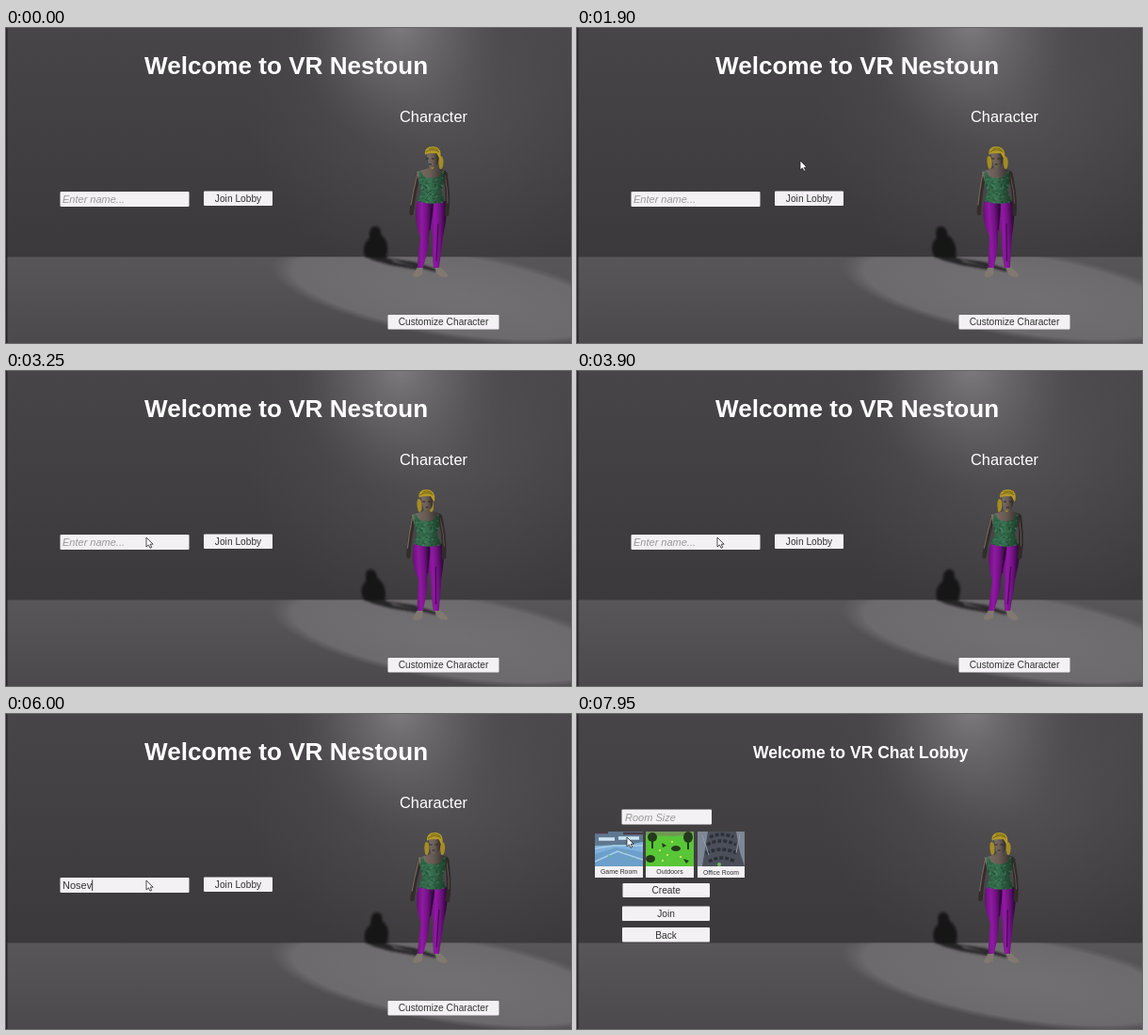
Recreate the animation shown at these times as an HTML page. Size 600 by 335 pixels, loop 8 s.

```html
<!DOCTYPE html>
<html lang="en">
<head>
<meta charset="utf-8">
<title>VR Nestoun</title>
<style>
  html, body { margin: 0; width: 100%; height: 100%; overflow: hidden; background: #444; }
  svg { display: block; width: 100vw; height: 100vh; }
  text { font-family: "Liberation Sans", Arial, sans-serif; fill: #323232; }
  .title { font-weight: bold; fill: #fff; }
  .button { font-size: 10.2px; text-anchor: middle; }
  .hint { font-size: 11px; font-style: italic; fill: #999; }
  .label { font-size: 6.9px; text-anchor: middle; }
  .field { fill: #f3f1f3; }
</style>
</head>
<body>
<svg viewBox="0 0 600 335">
  <defs>
    <linearGradient id="wall" x2="0" y2="1">
      <stop offset="0" stop-color="#474547"/><stop offset=".5" stop-color="#413f41"/><stop offset="1" stop-color="#3b393b"/>
    </linearGradient>
    <radialGradient id="glow">
      <stop offset="0" stop-color="#666466" stop-opacity=".5"/><stop offset="1" stop-color="#5c5a5c" stop-opacity="0"/>
    </radialGradient>
    <radialGradient id="lamp">
      <stop offset="0" stop-color="#999799" stop-opacity=".65"/><stop offset=".55" stop-color="#807e80" stop-opacity=".32"/>
      <stop offset="1" stop-color="#666466" stop-opacity="0"/>
    </radialGradient>
    <linearGradient id="floor" x2="0" y2="1">
      <stop offset="0" stop-color="#585658"/><stop offset="1" stop-color="#4b494b"/>
    </linearGradient>
    <radialGradient id="pool">
      <stop offset="0" stop-color="#727072"/><stop offset=".87" stop-color="#6c6a6c"/>
      <stop offset="1" stop-color="#666466" stop-opacity="0"/>
    </radialGradient>
    <linearGradient id="trousers">
      <stop offset="0" stop-color="#641272"/><stop offset=".35" stop-color="#9119a4"/>
      <stop offset=".62" stop-color="#721283"/><stop offset="1" stop-color="#23062a"/>
    </linearGradient>
    <linearGradient id="shirt">
      <stop offset="0" stop-color="#31684b"/><stop offset=".45" stop-color="#37714f"/><stop offset="1" stop-color="#1b3a29"/>
    </linearGradient>
    <linearGradient id="skin">
      <stop offset="0" stop-color="#7d7068"/><stop offset=".5" stop-color="#685b54"/><stop offset="1" stop-color="#2b2625"/>
    </linearGradient>
    <pattern id="specks" width="16" height="18" patternUnits="userSpaceOnUse"></pattern>
    <filter id="soft" x="-30%" y="-30%" width="160%" height="160%"><feGaussianBlur stdDeviation="1"/></filter>
  </defs>

  <rect width="600" height="244" fill="url(#wall)"/>
  <svg width="600" height="244">
    <ellipse cx="465" cy="85" rx="210" ry="190" fill="url(#glow)"/>
    <ellipse cx="418" cy="-8" rx="112" ry="135" fill="url(#lamp)"/>
  </svg>
  <rect y="243.5" width="600" height="92" fill="url(#floor)"/>
  <svg y="243.5" width="600" height="92">
    <ellipse rx="192" ry="47" transform="translate(470 39) rotate(9)" fill="url(#pool)"/>
  </svg>
  <rect width="1.5" height="335" fill="#292729"/>

  <g id="shadow" filter="url(#soft)" fill="#171518">
    <path d="M389 212C394 209 399 213 398 220C403 223 406 230 405 237L404 244L382 244C378 237 380 228 386 224C386 219 386 214 389 212Z"/>
    <path d="M382 243L405 244L412 249L437 254V257L408 252L390 247ZM400 244L434 249L458 257L455 259L430 252Z" opacity=".85"/>
  </g>

  <g id="figure">
    <g fill="#817870">
      <path d="M438 253L443 253L442 262C438 266 431 266 432 262Z"/>
      <path d="M455 253L460 253L469 262C470 266 463 266 458 262Z"/>
    </g>
    <g fill="url(#trousers)">
      <path d="M450 183L467 184C469 196 467 208 464 222C463 234 461 245 460 255L454 255C453 244 452 233 453 222L449 200Z"/>
      <path d="M437 183L454 184C454 200 450 212 449 223C449 236 445 246 443 255L437 255C437 244 439 233 440 222C435 210 433 195 437 183Z"/>
    </g>
    <path d="M452 192L450 215M459 208L457 248" fill="none" stroke="#2d0735" stroke-width="1.3" opacity=".65"/>
    <g fill="none" stroke-linecap="round" stroke-linejoin="round">
      <path d="M438 155L434 173L432 184L430.500 197" stroke="#322d2b" stroke-width="4.500"/>
      <path d="M436.500 156L432.500 174L430 188" stroke="#74675f" stroke-width="1.300"/>
      <path d="M466.500 155L468.500 172L469 186L468 198" stroke="#302a29" stroke-width="4.500"/>
      <path d="M466 156L468.500 173L469 186" stroke="#625650" stroke-width="1"/>
    </g>
    <path d="M450 144L457 144L458 149L467 152L466 165L439 165L436 153L449 149Z" fill="url(#skin)"/>
    <path id="top" d="M439 152L441 152C443 160 448 159 453 160C458 159 461 158 463 152L465 152C466 162 464 168 462 173L466 185C457 188 445 187 437 184L441 173C438 166 438 159 439 152Z" fill="url(#shirt)"/>
    <path id="cloth" fill="url(#specks)"/>
    <g fill="#a48c24">
      <path id="braidLeft" d="M452 136C456 136 456 142 455 147C454 151 451 151 451 147C450 142 450 138 452 136Z"/>
      <path id="braidRight" d="M452 136C456 136 456 142 455 147C454 151 451 151 451 147C450 142 450 138 452 136Z"/>
    </g>
    <path d="M447 133C449 130 458 130 460 134L459 143C457 149 451 150 449 146Z" fill="url(#skin)"/>
    <path d="M445 135C444 129 448 126 453 126C460 126 463 131 461 139C459 138 459 135 457 133C453 134 449 132 445 135Z" fill="#b39a28"/>
    <path d="M446 132C450 129 456 129 460 132M449 129C453 127 456 128 459 130" fill="none" stroke="#65570f" stroke-width=".8"/>
    <path id="features" d="M448 139H451M454 139H457M451 145H454" stroke="#282321" stroke-width="1.1"/>
  </g>

  <g id="welcome">
    <text class="title" x="147" y="49" font-size="26.1">Welcome to VR Nestoun</text>
    <text x="418" y="100" font-size="16.4" style="fill:#fff">Character</text>
    <rect id="nameField" class="field" x="57.500" y="174" width="137" height="16" rx="1"/>
    <text id="nameHint" class="hint" x="60" y="186">Enter name...</text>
    <text id="name" x="60" y="186" font-size="11"></text>
    <rect id="caret" y="176.500" width="1" height="11.500" fill="#323232"/>
  </g>

  <g id="lobby">
    <text class="title" x="187" y="47" font-size="17.55">Welcome to VR Chat Lobby</text>
    <rect class="field" x="47.500" y="101.500" width="95.500" height="16" rx="1"/>
    <text class="hint" x="51" y="113.500">Room Size</text>
    <svg x="19" y="125" width="51" height="37">
      <rect width="51" height="37" fill="#7fb2dc"/>
      <path d="M0 0H51V11L35 14L0 15Z" fill="#5f7890"/>
      <path d="M0 24L22 17L51 22V37H0Z" fill="#6c9fc9"/>
      <path d="M4 8H21M25 7H47" stroke="#cbe4f2" stroke-width="3.500"/>
      <path d="M0 1H14M30 2H51" stroke="#4a3b45" stroke-width="2.500"/>
      <path d="M0 18L20 15H51M0 32L24 21L51 30" fill="none" stroke="#a9cfea" stroke-width="1.500"/>
      <path d="M14 26h3M30 22h2M38 29h3" stroke="#63b87d" stroke-width="1.500"/>
    </svg>
    <svg x="73" y="125" width="51" height="37">
      <rect width="51" height="37" fill="#58c636"/>
      <path d="M0 0H51V3L30 5L0 4Z" fill="#6f9a55"/>
      <g fill="#25391d">
        <ellipse cx="7" cy="6" rx="5" ry="5"/><rect x="6" y="10" width="2" height="8"/>
        <ellipse cx="45" cy="6" rx="5" ry="6"/><rect x="44" y="11" width="2" height="8"/>
        <ellipse cx="32" cy="18" rx="5" ry="3"/><ellipse cx="5" cy="29" rx="5" ry="4"/>
        <path d="M17 12l5 3l-4 2zM40 29l6 2l-3 3z"/>
      </g>
      <path d="M14 20h2M22 25h2M17 31h2M36 27h2M27 11h2" stroke="#c6e85f" stroke-width="2"/>
    </svg>
    <svg x="128" y="125" width="50" height="37">
      <rect width="50" height="37" fill="#4a4f5a"/>
      <path d="M0 0H11L5 37H0ZM41 0H50V37L45 22Z" fill="#7d8795"/>
      <path d="M13 6Q25 0 38 6M10 14Q25 6 41 14M9 23Q25 15 42 23M12 32Q25 24 40 32" fill="none" stroke="#2c3039" stroke-width="3.500" stroke-dasharray="4 2"/>
      <path d="M5 4L12 25M45 3L41 23" stroke="#929da7"/>
      <circle cx="23" cy="35" r="2" fill="#72b95e"/>
    </svg>
  </g>

  <path id="cursor" d="M0 0V10L2.400 7.900L4 11.300L5.700 10.500L4.200 7.200H7.200Z" fill="#fff" stroke="#222" stroke-width=".8"/>
</svg>

<script>
const LOOP = 8000, LOBBY_START = 6850;
const $ = id => document.getElementById(id);

function add(parent, tag, attributes, content = "") {
  const node = document.createElementNS("http://www.w3.org/2000/svg", tag);
  for (const key in attributes) node.setAttribute(key, attributes[key]);
  node.textContent = content;
  parent.append(node);
}

function addBox(parent, label, x, y, width, height, textClass, baseline) {
  add(parent, "rect", { class: "field", x, y, width, height, rx: textClass === "button" ? 1 : 0 });
  add(parent, "text", { class: textClass, x: x + width / 2, y: y + baseline }, label);
}

addBox($("welcome"), "Join Lobby", 210, 173.5, 73, 15.5, "button", 11.5);
addBox($("welcome"), "Customize Character", 405.5, 305, 118, 15.5, "button", 11);
addBox($("lobby"), "Create", 48.5, 180, 92.5, 15, "button", 11);
addBox($("lobby"), "Join", 48, 204.5, 93, 15.5, "button", 11.5);
addBox($("lobby"), "Back", 48, 227, 93, 15.5, "button", 11.5);
addBox($("lobby"), "Game Room", 19, 162, 51, 12, "label", 8);
addBox($("lobby"), "Outdoors", 73, 162, 51, 12, "label", 8);
addBox($("lobby"), "Office Room", 128, 162, 50, 12, "label", 8.5);

// Mottled cloth from a seeded generator
let seed = 11;
const random = () => (seed = seed * 16807 % 2147483647) / 2147483647;
for (let i = 0; i < 60; i++) {
  add($("specks"), "rect", {
    x: random() * 16, y: random() * 18, width: 1.2, height: 1.1,
    fill: i % 3 ? "#173524" : "#559674", opacity: .7
  });
}
$("cloth").setAttribute("d", $("top").getAttribute("d"));

// Keys are [time, value, ...]
const sway = [[0, 0], [350, 1.5], [1100, -4], [1900, -7], [3250, -6], [3900, 4],
  [4700, 0], [5150, 0], [5600, 3], [6400, 1], [6850, .5], [7950, -4], [8000, -4]];
const turn = [[0, 0], [500, 0], [1100, .5], [1900, .5], [3250, .75], [3900, 1],
  [5150, 1], [6100, .5], [6700, 0], [7200, 0], [7950, .5], [8000, .5]];
const pointer = [[350, -8, 112], [850, 290, 100], [1200, 340, 62], [1650, 276, 95],
  [1900, 237, 141], [2450, 149, 177], [6000, 149, 177], [6600, 240, 180],
  [6850, 226, 173.5], [7500, 60, 120], [7700, 56, 115], [7950, 53, 131], [8000, 53, 131]];

function sample(keys, time) {
  let i = 1;
  while (i < keys.length - 1 && keys[i][0] < time) i++;
  const from = keys[i - 1], to = keys[i];
  const p = Math.min(1, Math.max(0, (time - from[0]) / (to[0] - from[0])));
  const eased = p * p * (3 - 2 * p);
  return from.slice(1).map((value, n) => value + (to[n + 1] - value) * eased);
}

const show = (id, visible) => $(id).setAttribute("visibility", visible ? "visible" : "hidden");
const move = (id, x, y = 0) => $(id).setAttribute("transform", `translate(${x} ${y})`);

// Shears an element sideways while the height y = ground stays put
const leanOver = (id, slope, ground) =>
  $(id).setAttribute("transform", `matrix(1 0 ${-slope} 1 ${slope * ground} 0)`);

function drawFigure(t) {
  const [lean] = sample(sway, t), [facing] = sample(turn, t);
  leanOver("figure", lean / 118, 258);
  leanOver("shadow", lean / 55, 257);
  move("braidLeft", -8 * Math.min(1, facing * 2));
  move("braidRight", 9 * Math.min(1, 2 - facing * 2));
  move("features", -2 + facing * 3);
}

function drawName(t) {
  const typed = "Nosev".slice(0, [4800, 5080, 5250, 5450, 5650].filter(time => t >= time).length);
  $("name").textContent = typed;
  show("nameHint", !typed && t < LOBBY_START);
  const typing = t >= 4800 && t < 5950;
  const blink = t >= 3300 && (t - 3300) % 1176 < 588;
  show("caret", t < LOBBY_START && (typing || blink));
  $("caret").setAttribute("x", 60 + $("name").getComputedTextLength());
}

function draw(now) {
  const t = now % LOOP;
  show("welcome", t < LOBBY_START);
  show("lobby", t >= LOBBY_START);
  drawFigure(t);
  drawName(t);
  show("cursor", t >= 350);
  move("cursor", ...sample(pointer, t));
  requestAnimationFrame(draw);
}
requestAnimationFrame(draw);
</script>
</body>
</html>
```
